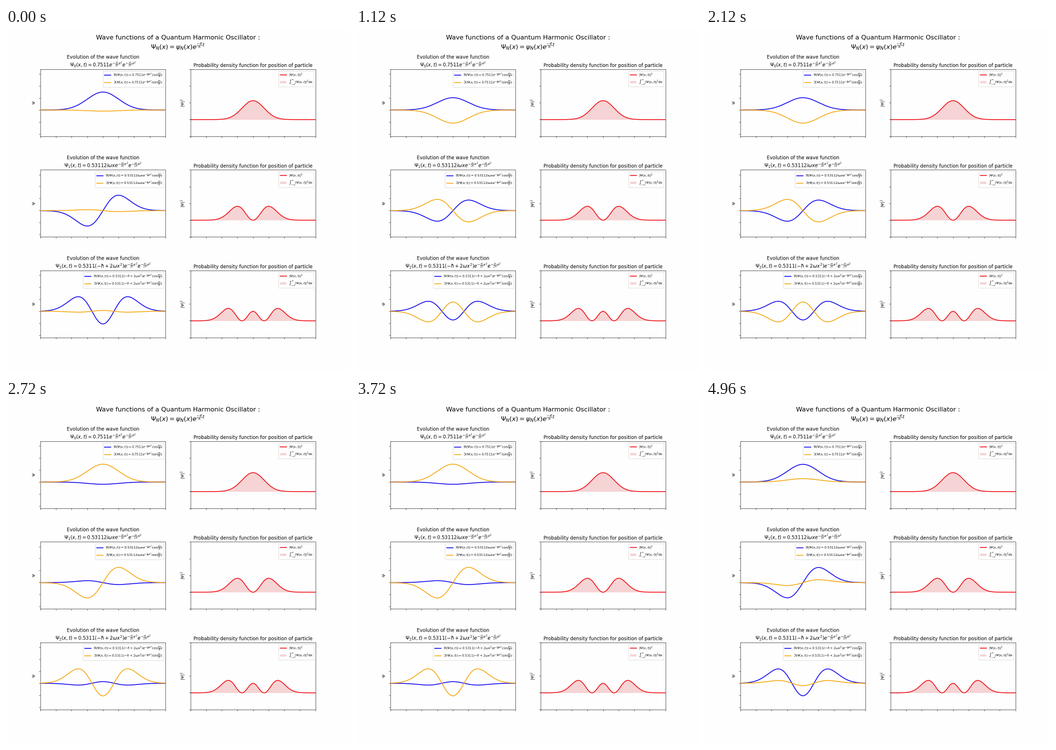
These frames come from a looping animation (600x600 px, 5000 ms). A matplotlib script:

```python
import numpy as np
import matplotlib.pyplot as plt
from matplotlib.animation import FuncAnimation

FRAMES, INTERVAL = 125, 40
FRAMES_PER_TURN = 25
START_TURN = 0.01

BLUE, ORANGE, RED = "#0a00ea", "#f8a50a", "#ee0a10"
X_LIM = (-4, 4)
WAVE_LIM = (-1.1, 1.7)
DENSITY_LIM = (-0.5, 1.5)

plt.rcParams.update({
    "font.family": "DejaVu Sans",
    "mathtext.fontset": "dejavusans",
    "figure.facecolor": "#fefeff",
    "axes.facecolor": "#fefeff",
    "lines.linewidth": 2,
})

x = np.linspace(*X_LIM, 400)
gauss = np.pi ** -0.25 * np.exp(-x ** 2 / 2)
waves = [gauss, np.sqrt(2) * x * gauss, (2 * x ** 2 - 1) / np.sqrt(2) * gauss]

factors = ["0.7511", r"0.53112i\omega x", r"0.5311(-\hbar+2\omega x^2)"]
DECAY = r"e^{-\frac{\omega}{2\hbar}x^2}"
ANGLE = r"(\frac{Et}{\hbar})"


def style(ax, y_lim, first_tick, label):
    ax.set(xlim=X_LIM, ylim=y_lim, ylabel=label,
           xticks=np.arange(-4, 5), yticks=np.arange(first_tick, 1.6, 0.5))
    ax.set_xticklabels([])
    ax.set_yticklabels([])
    ax.legend(loc="upper right", fontsize=8)


def wave_panel(ax, n, factor):
    ax.set_title("Evolution of the wave function\n"
                 rf"$\Psi_{n}(x,t)={factor}{DECAY}{DECAY}$")
    ax.plot([], [], color=BLUE,
            label=rf"$\Re(\Psi(x,t))={factor}{DECAY}\cos{ANGLE}$")
    ax.plot([], [], color=ORANGE,
            label=rf"$\Im(\Psi(x,t))={factor}{DECAY}i\sin{ANGLE}$")
    style(ax, WAVE_LIM, -1, r"$\Psi$")


def density_panel(ax, wave):
    ax.set_title("Probability density function for position of particle")
    ax.plot(x, wave ** 2, color=RED, label=r"$|\Psi(x,t)|^2$")
    ax.fill_between(x, wave ** 2, color="tab:red", alpha=0.2, linewidth=0,
                    label=r"$\int_{-\infty}^{\infty}|\Psi(x,t)|^2$dx")
    style(ax, DENSITY_LIM, -0.5, r"$|\Psi|^2$")


def render_smooth(fig):
    """Draw the figure at double resolution and average down to stage size."""
    dpi = fig.dpi
    fig.set_dpi(2 * dpi)
    fig.canvas.draw()
    big = np.array(fig.canvas.buffer_rgba(), dtype=float)
    fig.set_dpi(dpi)
    h, w = big.shape[0] // 2, big.shape[1] // 2
    small = big.reshape(h, 2, w, 2, 4).mean(axis=(1, 3))
    return np.round(small).astype(np.uint8)


fig = plt.figure(figsize=(12, 12), dpi=50)
axes = fig.subplots(3, 2)
fig.subplots_adjust(left=0.1, right=0.9, bottom=0.1, top=0.88,
                    wspace=0.2, hspace=0.5)
fig.suptitle("Wave functions of a Quantum Harmonic Oscillator :\n"
             r"$\Psi_N(x)=\psi_N(x)e^{\frac{-iE}{\hbar}t}$", fontsize=16)
for n, (left, right) in enumerate(axes):
    wave_panel(left, n, factors[n])
    density_panel(right, waves[n])

# Everything but the waves stands still, so it is drawn only once.
boxes = [left.get_position() for left in axes[:, 0]]
backdrop = render_smooth(fig)
fig.clear()
fig.figimage(backdrop, zorder=-1)

curves = []
for box in boxes:
    ax = fig.add_axes(box, xlim=X_LIM, ylim=WAVE_LIM)
    ax.axis("off")
    real, = ax.plot(x, 0 * x, color=BLUE)
    imag, = ax.plot(x, 0 * x, color=ORANGE)
    curves.append((real, imag))


def update(frame):
    phase = -2 * np.pi * (frame / FRAMES_PER_TURN + START_TURN)
    for wave, (real, imag) in zip(waves, curves):
        real.set_ydata(wave * np.cos(phase))
        imag.set_ydata(wave * np.sin(phase))
    return [line for pair in curves for line in pair]


anim = FuncAnimation(fig, update, frames=FRAMES, interval=INTERVAL, repeat=True)
plt.show()
```
